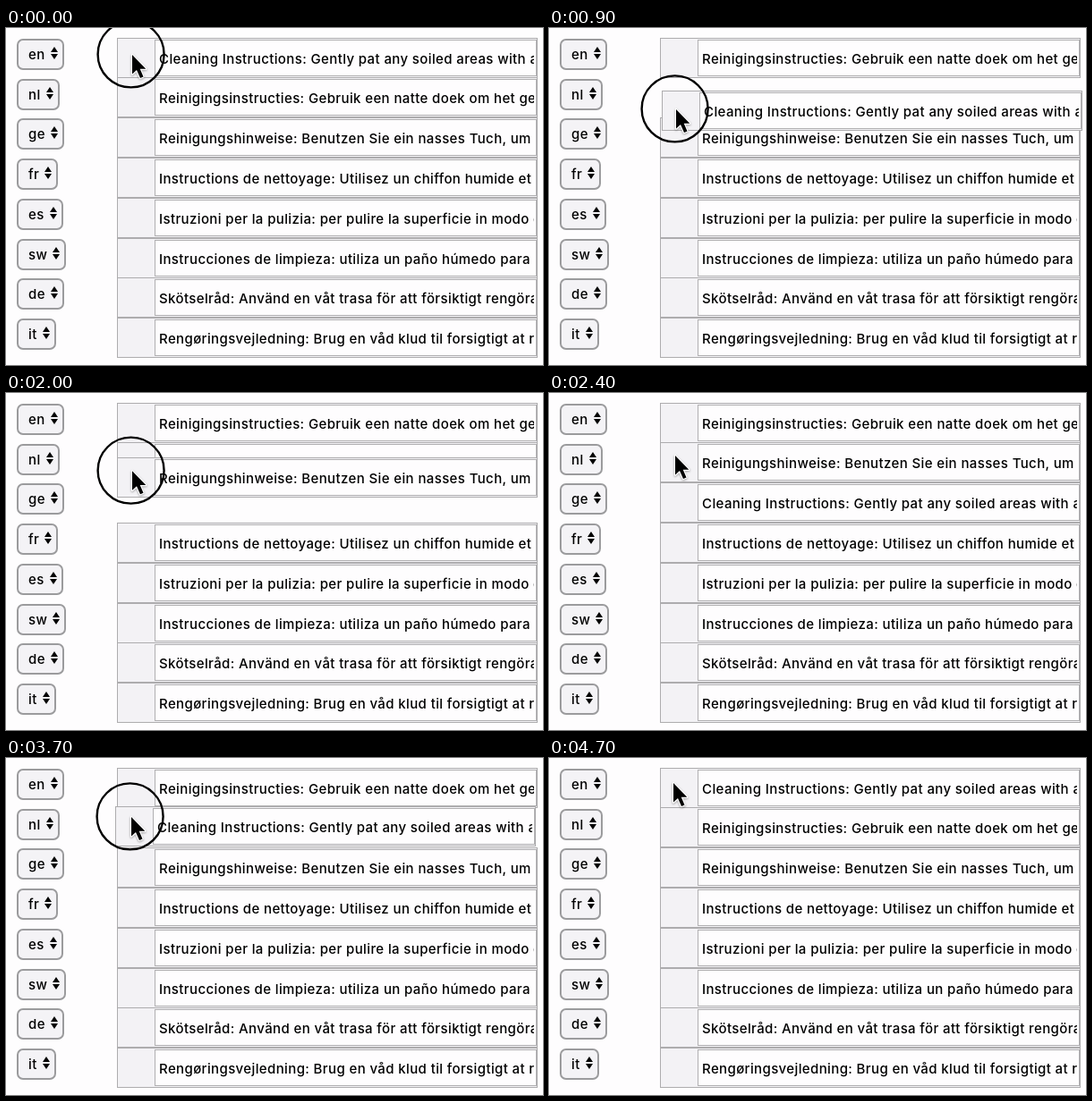
Write an HTML page that moves like this. It is 600 px wide and 377 px high and loops after 4.9 s.

```html
<!DOCTYPE html>
<html lang="en">
<head>
<meta charset="utf-8">
<title>Sortable rows</title>
<style>
html, body { margin: 0; width: 100%; height: 100%; overflow: hidden; background: #fefdfe; }
body { position: relative; font: 500 15px Inter, sans-serif; letter-spacing: .38px; color: #000; white-space: nowrap; }
.lang, .row, .text, svg.top { position: absolute; box-sizing: border-box; }
.lang {
  left: 12px; height: 35px; padding: 0 5px 0 11px; line-height: 31px;
  display: flex; align-items: center; gap: 6px;
  border: 2px solid #9b9b9d; border-radius: 7px; background: #f4f3f6;
}
.lang svg { margin-top: -3px; }
.row { left: 0; top: 0; width: 470px; height: 45px; border: 1px solid #adacae; background: #f3f2f5; }
.text {
  left: 41px; top: 1px; width: 427px; height: 41px; padding: 0 2px 0 4px; line-height: 41px;
  border: 1px solid #b0afb1; background: #fefdfe; overflow: clip; overflow-clip-margin: content-box;
}
svg.top { left: 0; top: 0; z-index: 3; }
#arrow { filter: drop-shadow(0 1px 1px #0005); }
</style>
</head>
<body>
<svg class="top" width="600" height="377">
  <g id="pointer">
    <circle id="ring" cx=".6" cy=".4" r="37" fill="none" stroke="#000" stroke-width="2.4"/>
    <path id="arrow" d="M2 1V22.5L7 18L11 27L14.5 25.5L10.7 16.7H17.3Z" stroke="#fff" stroke-width="2.4" stroke-linejoin="round" paint-order="stroke"/>
  </g>
</svg>
<script>
const LOOP = 4900, STEP = 100, PITCH = 44.76;
const langs = ['en', 'nl', 'ge', 'fr', 'es', 'sw', 'de', 'it'];
const texts = [
  'Cleaning Instructions: Gently pat any soiled areas with a damp cloth',
  'Reinigingsinstructies: Gebruik een natte doek om het gebied',
  'Reinigungshinweise: Benutzen Sie ein nasses Tuch, um die',
  'Instructions de nettoyage: Utilisez un chiffon humide et',
  'Istruzioni per la pulizia: per pulire la superficie in modo delicato',
  'Instrucciones de limpieza: utiliza un paño húmedo para',
  'Skötselråd: Använd en våt trasa för att försiktigt rengöra',
  'Rengøringsvejledning: Brug en våd klud til forsigtigt at rengøre'
];

// Eased pointer moves
const home = { x: 139, y: 29 };
const moves = [
  { from: 100, to: 900, x: 140, y: 90 },
  { from: 1300, to: 1600, x: 139, y: 118 },
  { from: 1700, to: 2200, x: 139, y: 69 },
  { from: 2400, to: 2500, x: 139, y: 72 },
  { from: 2600, to: 2900, x: 139.5, y: 116 },
  { from: 2900, to: 3700, x: 138, y: 65 },
  { from: 4000, to: 4600, x: 137, y: 27 }
];

// A row follows the pointer shortly after the press and settles after the release
const PICKUP = 200, SETTLE = 100;
const drags = [
  { row: 0, press: 0, release: 1000, grab: 20, dir: 1, swaps: [800] },
  { row: 2, press: 1700, release: 2300, grab: 14, dir: -1, swaps: [2100] },
  { row: 0, press: 2900, release: 4600, grab: 11, dir: -1, swaps: [3600, 4400] }
];

const slotTop = (slot, first) => Math.floor(first + PITCH * slot);
const smooth = k => k * k * (3 - 2 * k);

function add(cls, html) {
  const el = document.createElement('div');
  el.className = cls;
  el.innerHTML = html;
  document.body.append(el);
  return el;
}

langs.forEach((lang, i) => {
  const arrows = '<svg width="8" height="14"><path d="M0 6L4 0L8 6ZM0 8L4 14L8 8Z"/></svg>';
  add('lang', lang + arrows).style.top = slotTop(i, 12.3) + 'px';
});
const rows = texts.map(text => add('row', `<div class="text">${text}</div>`));

function pointerAt(t) {
  let { x, y } = home;
  for (const m of moves) {
    if (t <= m.from) break;
    const k = smooth(Math.min(1, (t - m.from) / (m.to - m.from)));
    x += (m.x - x) * k;
    y += (m.y - y) * k;
  }
  return { x, y };
}

function orderAt(t) {
  const order = texts.map((_, i) => i);
  for (const { row, dir, swaps } of drags) {
    for (const time of swaps) {
      if (t < time) continue;
      const slot = order.indexOf(row);
      order[slot] = order[slot + dir];
      order[slot + dir] = row;
    }
  }
  return order;
}

function place(row, x, y, z) {
  row.style.transform = `translate(${Math.round(x)}px, ${Math.round(y)}px)`;
  row.style.zIndex = z;
}

function draw(t) {
  const { x, y } = pointerAt(t);
  orderAt(t).forEach((id, slot) => place(rows[id], 124, slotTop(slot, 11.22), 1));

  const drag = drags.find(d => t >= d.press + PICKUP && t < d.release + SETTLE);
  if (drag) place(rows[drag.row], 124 + 2 * (x - home.x), y - drag.grab, 2);

  pointer.setAttribute('transform', `translate(${x} ${y})`);
  ring.style.display = drags.some(d => t >= d.press && t < d.release) ? '' : 'none';
}

const start = performance.now();
function tick() {
  const t = (performance.now() - start) % LOOP;
  draw(Math.floor(t / STEP) * STEP);
  requestAnimationFrame(tick);
}
tick();
</script>
</body>
</html>
```
